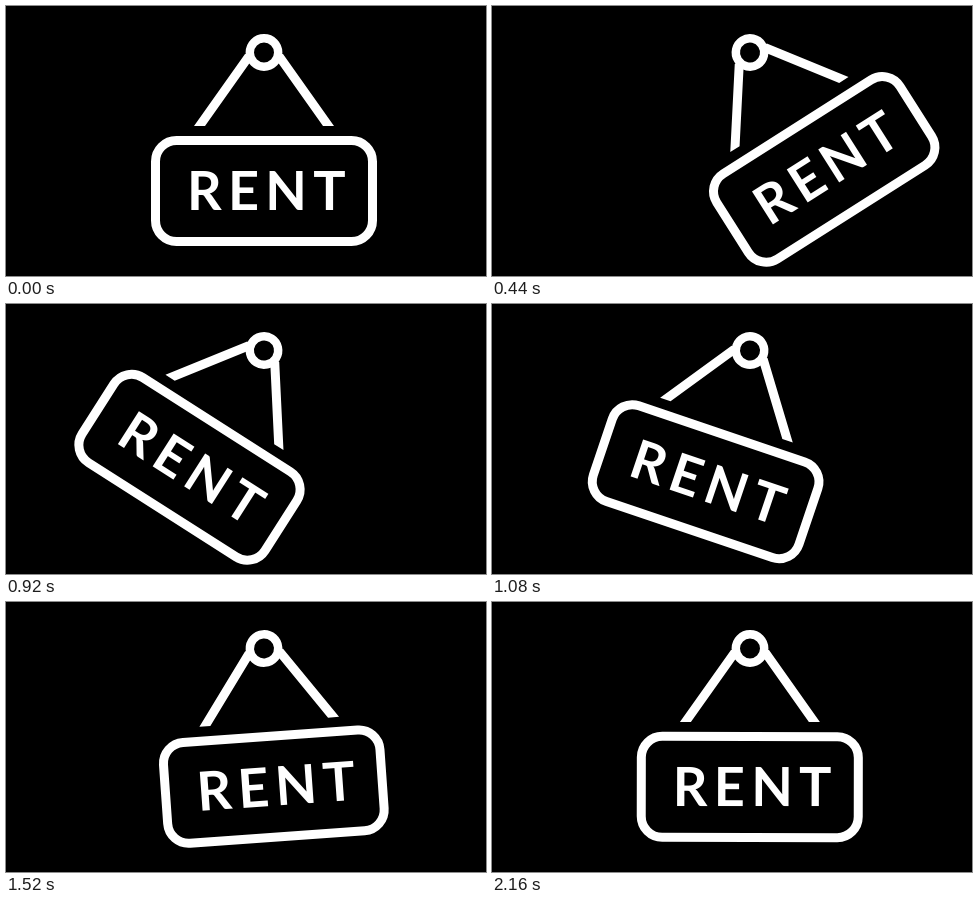
Write an HTML page that moves like this. It is 480 px wide and 270 px high and loops after 2400 ms.

```html
<!DOCTYPE html>
<html>
<head>
<meta charset="utf-8">
<style>
html, body { margin: 0; width: 100%; height: 100%; overflow: hidden; background: #000; }
svg { display: block; width: 100vw; height: 100vh; }
text { font: 700 54px Lato, "Open Sans", sans-serif; letter-spacing: 6.3px; }
</style>
</head>
<body>
<svg viewBox="0 0 480 270">
  <g id="sign" fill="#fff">
    <path d="M188 120h11L250 48H239Z M328 120h-11L266 48h11Z"/>
    <circle cx="258" cy="46.5" r="14.2" fill="#000" stroke="#fff" stroke-width="8.4"/>
    <rect x="149.5" y="134.5" width="217" height="101" rx="21" fill="none" stroke="#fff" stroke-width="9"/>
    <text x="181" y="204">RENT</text>
  </g>
</svg>
<script>
const LOOP = 2400;
// Swing extremes: [time in ms, degrees clockwise]
const keys = [[20, 0], [380, -35], [890, 33], [1415, -15], [1622, 6.4], [2200, 0]];
const sign = document.getElementById("sign");
const smooth = u => u * u * (3 - 2 * u);

function angle(t) {
  for (let i = 1; i < keys.length; i++) {
    const [t0, a] = keys[i - 1], [t1, b] = keys[i];
    if (t < t1) return a + (b - a) * smooth(Math.max(0, (t - t0) / (t1 - t0)));
  }
  return 0;
}

// The last, slow swing advances in longer steps and then rests.
function snap(t) {
  const step = t < 1600 ? 40 : 80;
  return Math.min(2160, Math.floor(t / step) * step);
}

function draw() {
  const t = snap(performance.now() % LOOP);
  sign.setAttribute("transform", `rotate(${angle(t)} 258 46.5)`);
  requestAnimationFrame(draw);
}
draw();
</script>
</body>
</html>
```
